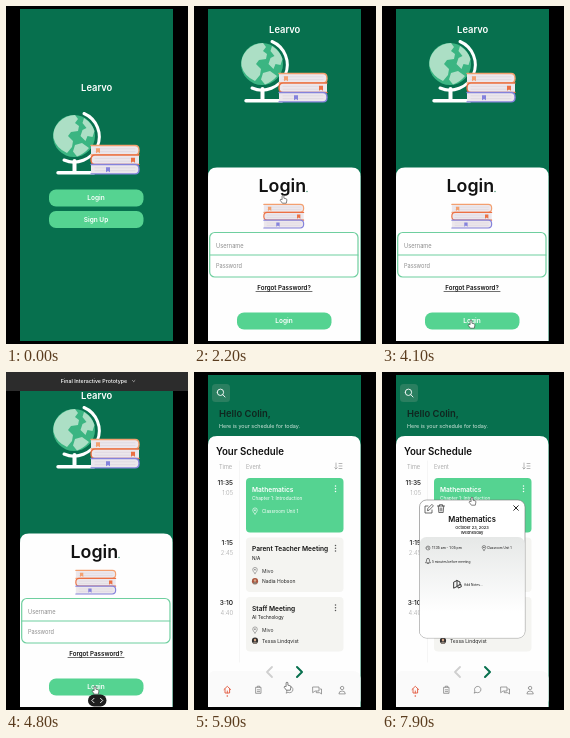
Animation, 182 px wide and 338 px high, one loop 8 s. Source, as an HTML page:

```html
<!DOCTYPE html>
<html lang="en">
<head>
<meta charset="utf-8">
<style>
html, body { margin: 0; width: 100%; height: 100%; overflow: hidden; background: #000; }
svg { display: block; width: 100vw; height: 100vh; }
text { font-family: Inter, "Open Sans", sans-serif; white-space: pre; }
.ic { fill: none; stroke-linecap: round; stroke-linejoin: round; }
</style>
</head>
<body>
<svg id="stage" viewBox="0 0 182 338"></svg>
<script>
const GREEN = '#07704e', MINT = '#55d391', INK = '#111', GREY = '#8d8d8d';

const text = (s, x, y, size, fill = INK, weight = 400, anchor = 'start') =>
  `<text x="${x}" y="${y}" font-size="${size}" fill="${fill}" font-weight="${weight}" text-anchor="${anchor}">${s}</text>`;
const mid = (s, x, y, size, fill, weight) => text(s, x, y, size, fill, weight, 'middle');
const rect = (x, y, w, h, r, fill, extra = '') =>
  `<rect x="${x}" y="${y}" width="${w}" height="${h}" rx="${r}" fill="${fill}" ${extra}/>`;
const circle = (x, y, r, fill) => `<circle cx="${x}" cy="${y}" r="${r}" fill="${fill}"/>`;
const line = (d, color, w = .7) => `<path class="ic" d="${d}" stroke="${color}" stroke-width="${w}"/>`;
const group = (id, body) => `<g id="${id}">${body}</g>`;
const at = (x, y, body, s = 1) => `<g transform="translate(${x} ${y}) scale(${s})">${body}</g>`;
const button = (label, y) => rect(43, y, 94.5, 17, 7, MINT) + mid(label, 90, y + 10.8, 6.5, '#fff', 600);
const panel = y => `<path d="M14 ${y + 9}q0-9 9-9h134.5q9 0 9 9V335H14Z" fill="#fefefe"/>`;

// Three stacked books, top left at the origin, 49 x 29.
function books() {
  const book = (y, color, flip, mark) => {
    const d = flip ? `M1 ${y}H45q4 0 4 4.7t-4 4.7H1` : `M49 ${y}H5q-4 0-4 4.7t4 4.7H49`;
    return `<path d="${d}Z" fill="#ece7ec"/>` +
      line(`M5 ${y + 3.3}H45M5 ${y + 6.2}H45`, '#d3cbd6', .5) + line(d, color, 1.4) +
      `<path d="M${mark} ${y + 2.8}h4v5l-2-1.4l-2 1.4Z" fill="${color}"/>`;
  };
  return book(.5, '#f3a070', true, 6) + book(10, '#ec7043', false, 41) + book(19.5, '#8583dc', true, 16);
}

const globe = circle(68, 130, 21, '#3bb582') +
  `<path d="M53 116q7-7 16-7l3 4l-3 4l4 3l-1 5l-7 1l-3 4l5 5l-1 6l-5 6q-11-5-13.500-15q-1-9 5.500-16Z
    M78 112q8 5 10.500 13l-2 6l-5-1l-2 5l-5-5l2-6l4-2l-4-5Z
    M69 139l7-2l7 5q-5 6-12 8.500l-4-5Z" fill="#acdfc5"/>` +
  line('M78 107.5A25 25 0 0 1 58 154', '#fff', 3) +
  line('M68.5 155V166', '#fff', 4) + line('M52 166.8H88', '#fff', 3.4);

const pin = (x, y, color, s = 1) => at(x, y,
  line('M0 3Q-2.3.8-2.3-.8A2.3 2.3 0 0 1 2.3-.8Q2.3.8 0 3ZM-.6-.8a.6.6 0 1 0 1.2 0a.6.6 0 1 0-1.2 0', color, .6), s);

function card(y, title, sub, place, person, hair) {
  const green = !person, main = green ? '#fff' : INK;
  let s = rect(52, y, 97.5, 54.5, 4, green ? MINT : '#f4f4f1') +
    text(title, 58, y + 13.5, 6.6, main, 600) + text(sub, 58, y + 22.4, 4.7, main) +
    pin(61, y + 33, green ? '#fff' : '#777') + text(place, 68, y + 35, green ? 4.6 : 5, green ? '#fff' : '#333');
  for (let i = 0; i < 3; i++) s += circle(141.5, y + 8 + i * 2.8, .75, green ? '#fff' : '#555');
  if (person) s += circle(61, y + 43.7, 3.1, hair) + circle(61, y + 43, 1.2, '#d9ab8d') +
    `<path d="M58.8 ${y + 45.9}q2.2-2.8 4.4 0q-2.2 1.8-4.4 0Z" fill="#8c8278"/>` + text(person, 68, y + 45.5, 5, '#222');
  return s;
}

const slot = (y, from, to) =>
  text(from, 39, y, 6.6, INK, 500, 'end') + text(to, 39, y + 10, 5.8, '#a5a5a5', 300, 'end');

const loginPage = panel(161.5) + mid('Login', 88.3, 186.3, 17.8, INK, 600) + circle(113, 185.5, .8, '#5a9c80') +
  at(69, 198, books(), .83) +
  rect(15.7, 226.5, 148.3, 44.5, 5, '#fff', 'stroke="#6fcf9f" stroke-width="1.2"') +
  line('M16 249H164', '#6fcf9f', 1.1) +
  text('Username', 22, 241.5, 5.7, GREY) + text('Password', 22, 262, 5.6, GREY) +
  mid('Forgot Password?', 90, 284, 6.2, INK, 600) + line('M62 285.5H118', INK, .6);

const schedulePage = rect(14, 3, 153, 332, 0, GREEN) +
  rect(18, 12, 18, 18, 3.5, '#2a7f60') +
  line('M23.2 20.3a3.2 3.2 0 1 0 6.4 0a3.2 3.2 0 1 0-6.4 0M28.8 22.7L31 25', '#fff', .9) +
  text('Hello Colin,', 25, 45, 9.4, '#10261f', 600) +
  text('Here is your schedule for today.', 25, 56, 5.4, '#d4e8df') +
  panel(64) + text('Your Schedule', 22, 83, 9.7, INK, 600) +
  text('Time', 25, 96.5, 5.6, '#aaa') + text('Event', 52, 96.5, 5.6, '#aaa') +
  line('M142 91v6l-1.3-1.3M142 97l1.3-1.3M145 91.5h3M145 94h3M145 96.5h3', '#999') +
  line('M45.5 89V290', '#eee', .6) +
  slot(113, '11:35', '1:05') + slot(173, '1:15', '2:45') + slot(233, '3:10', '4:40') +
  card(106, 'Mathematics', 'Chapter 1: Introduction', 'Classroom Unit 1') +
  card(165.5, 'Parent Teacher Meeting', 'N/A', 'Mivo', 'Nadia Hobson', '#a9563f') +
  card(225, 'Staff Meeting', 'AI Technology', 'Mivo', 'Tessa Lindqvist', '#33302f') +
  rect(14, 299, 152.5, 36, 7, '#fafafa') +
  line('M78 295L73 300L78 305', '#cfcfcf', 1.8) +
  line('M103 295L108 300L103 305', GREEN, 2) +
  line('M30 317.5L33.3 314.3L36.6 317.5M31 317V321H35.6V317M33.3 321v-2', '#e2573d', .9) + circle(33.3, 324, .8, '#e2573d') +
  line('M62 315.3h5v6h-5ZM63.3 315v-.8h2.4v.8M63.3 317.8h2.4M63.3 319.6h2.4', '#777') +
  line('M92.3 320.8l.6-1.7a3.2 3.2 0 1 1 1.5 1.4Z', '#777') +
  line('M119 315h6v4h-4l-2 1.5ZM126 317h1.5v5l-1.7-1.3h-3.5v-1', '#777') +
  line('M146.4 316a1.7 1.7 0 1 0 3.4 0a1.7 1.7 0 1 0-3.4 0M144.9 321.5q0-2.5 3.2-2.5t3.2 2.5Z', '#777');

const popup = rect(37.5, 128, 105.5, 138, 7, '#fff', 'stroke="#777" stroke-width=".6"') +
  rect(37.8, 165, 104.900, 100.7, 6.5, 'url(#sheet)') +
  line('M46 134h-3v7h7v-3M45.5 138.3l.4-1.9l4-4l1.5 1.5l-4 4Z', '#333') +
  line('M55.5 134h7M57.5 134v-1.3h3V134M56.3 134l.5 6.5h4.4l.5-6.5M58.2 136v3M59.8 136v3', '#333') +
  line('M131.7 133.7l4.6 4.6M136.3 133.7l-4.6 4.6', '#111', .9) +
  mid('Mathematics', 90, 149.5, 7.6, INK, 600) +
  mid('October 23, 2023', 90, 156.5, 4, INK, 500) + mid('Wednesday', 90, 162, 4, INK, 500) +
  line('M44 176a2 2 0 1 0 4 0a2 2 0 1 0-4 0M46 174.9V176l.8.5', '#333', .5) +
  text('11:35 am - 1:05 pm', 50, 177.2, 3.4) +
  pin(102, 176, '#333', .8) + text('Classroom Unit 1', 105, 177.2, 3.1) +
  line('M43.8 190.5q.8-.8.8-2.5t1.4-1.7t1.4 1.7t.8 2.500ZM45.5 191.5h1', '#333', .6) +
  text('5 minutes before meeting', 50, 190.5, 3.2) +
  line('M72 210l3-1.5v6l-3 1.5ZM75 208.5l3 1.5v3M76 213.5l2.8-1.2l.6 2.4l-2.8 1.2Z', '#222', .9) +
  text('Add Notes...', 82, 214.3, 3.2);

const chrome = rect(0, 0, 182, 19, 0, '#2c2c2c') + mid('Final Interactive Prototype', 88, 11, 5.3, '#fff', 500) +
  line('M126.5 8.5l1.2 1.2l1.2-1.2', '#ccc') + rect(82, 322.5, 18.5, 12, 6, '#1e1e1e') +
  line('M88 326.3l-2.2 2.2l2.2 2.2M94.5 326.3l2.2 2.2l-2.2 2.2', '#fff', .9);

const arrow = '<path d="M0 0V6L1.5 4.8L2.500 7L3.500 6.5L2.600 4.300H4.400Z" fill="#ddd" stroke="#444" stroke-width=".7"/>';
const hand = `<path d="M-.9 3.7V-.3q.9-1.2 1.8 0V2.2l2.3.6q.8.3.7 1.2l-.6 3.2H-.6L-2.8 4.3q0-1.2 1.1-.9Z"
  fill="#fff" stroke="#333" stroke-width=".6"/>`;

const stage = document.getElementById('stage');
stage.innerHTML = '<clipPath id="screen"><rect x="14" y="3" width="153" height="332"/></clipPath>' +
  '<linearGradient id="sheet" x2="0" y2="1"><stop stop-color="#e6e8e7"/><stop offset=".75" stop-color="#fff"/></linearGradient>' +
  '<g clip-path="url(#screen)">' + rect(14, 3, 153, 332, 0, GREEN) +
  group('signup', button('Sign Up', 205)) +
  group('hero', globe + at(84, 139, books())) +
  group('brand', mid('Learvo', 90.7, 85, 9.4, '#fff', 600)) +
  group('login', loginPage) + group('enter', button('Login', 183.5)) +
  group('schedule', schedulePage) + group('popup', popup) + '</g>' +
  group('chrome', chrome) + group('arrow', arrow) + group('hand', hand);

const el = id => document.getElementById(id);
const ramp = (t, a, b) => Math.min(1, Math.max(0, (t - a) / (b - a)));
const ease = (t, a, b) => { const p = ramp(t, a, b); return p * p * (3 - 2 * p); };
const fade = (id, o) => { el(id).style.opacity = o; el(id).style.display = o > 0 ? '' : 'none'; };
const move = (id, x, y) => el(id).setAttribute('transform', `translate(${x} ${y})`);

// Pointer stops: start, end, x, y reached.
const stops = [[1100, 1450, 89, 190], [2400, 3000, 53, 255], [3400, 4050, 89, 315],
  [5300, 5800, 93, 311], [6050, 6700, 90, 126]];

function pointer(t) {
  let x = 158, y = 218;
  for (const [a, b, nx, ny] of stops) {
    const p = ease(t, a, b);
    x += (nx - x) * p;
    y += (ny - y) * p;
  }
  return [x, y];
}

function draw(t) {
  const open = ease(t, 1600, 2000);
  move('brand', 0, -58.5 * open);
  move('hero', 0, -72 * open);
  move('login', 0, 176 * (1 - open));
  move('enter', 0, 123 * open);
  fade('login', open > 0 ? 1 : 0);
  fade('signup', 1 - open);
  fade('schedule', ease(t, 5100, 5400));
  fade('popup', ease(t, 6800, 7050));
  fade('chrome', ramp(t, 4300, 4450) - ramp(t, 5500, 5650));
  const [x, y] = pointer(t);
  const pointing = (t > 1350 && t < 2550) || (t > 3900 && t < 6150) || t > 6500;
  move('arrow', x, y);
  move('hand', x, y);
  fade('arrow', t > 1100 && !pointing ? 1 : 0);
  fade('hand', pointing ? 1 : 0);
}

function tick() {
  draw(performance.now() % 8000);
  requestAnimationFrame(tick);
}
tick();
</script>
</body>
</html>
```
